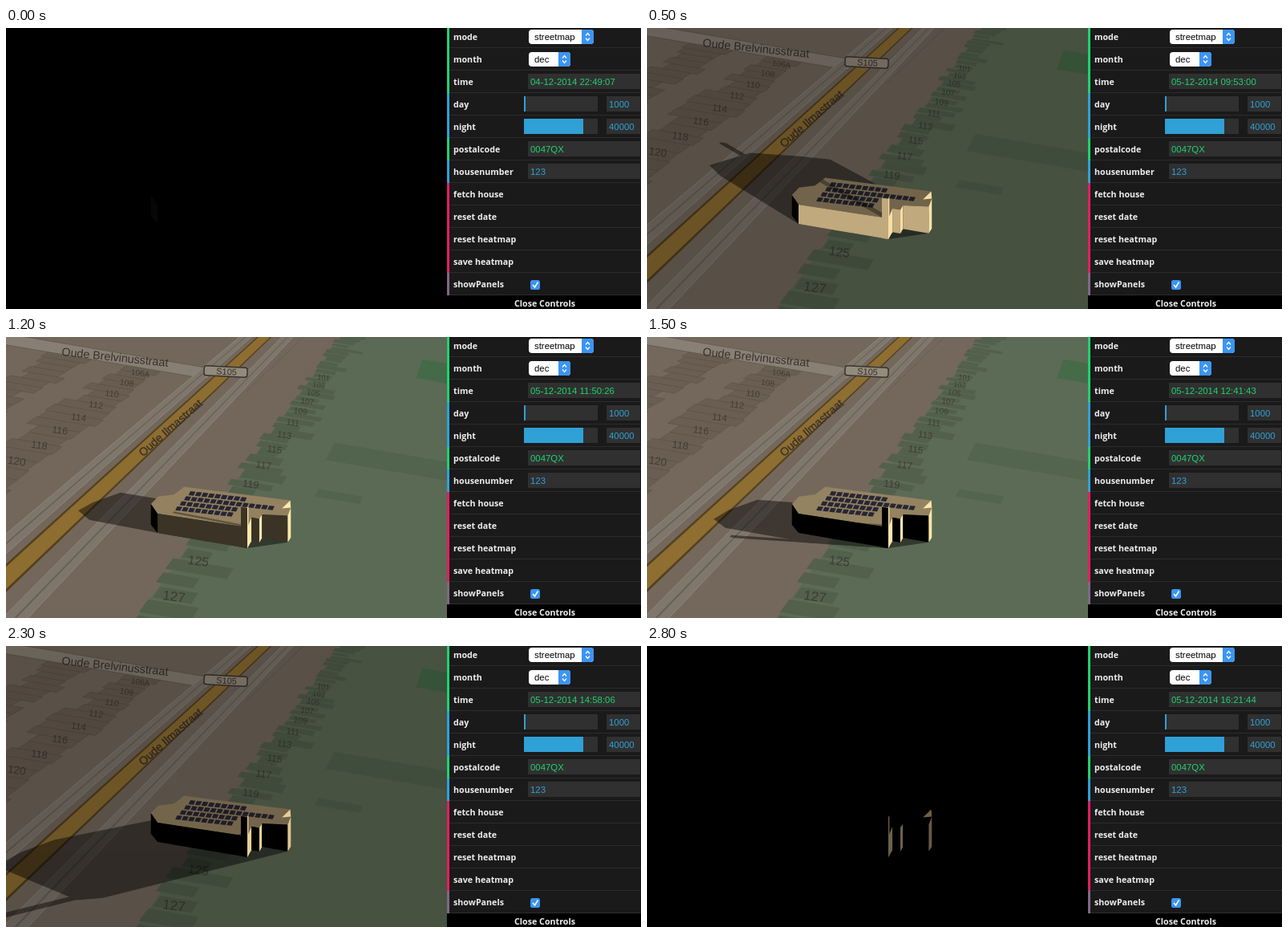
An HTML page that plays this animation: 792x350 px, repeating every 3100 ms.

```html
<!DOCTYPE html>
<html lang="en">
<head>
<meta charset="utf-8">
<title>Sun study</title>
<style>
html, body { margin: 0; width: 100%; height: 100%; overflow: hidden; background: #000; }
svg { display: block; width: 792px; height: 350px; }
.label { font: 700 10.7px "Open Sans", sans-serif; fill: #eee; }
.value { font: 11.4px "Liberation Sans", Arial, sans-serif; }
.map { font-family: "Liberation Sans", Arial, sans-serif; fill: #38312b; }
</style>
</head>
<body>
<svg id="stage" viewBox="0 0 792 350"></svg>
<script>
const GREEN = '#1ed36f', BLUE = '#2fa1d6', PINK = '#e61d5f', PURPLE = '#806787';
const rect = (x, y, w, h, fill, more = '') => `<rect x="${x}" y="${y}" width="${w}" height="${h}" fill="${fill}" ${more}/>`;
const poly = (points, fill, more = '') => `<polygon points="${points}" fill="${fill}" ${more}/>`;
const line = (points, width, color, more = '') => `<polyline points="${points}" fill="none" stroke="${color}" stroke-width="${width}" ${more}/>`;
const text = (x, y, str, cls, more = '') => `<text x="${x}" y="${y}" class="${cls}" ${more}>${str}</text>`;

// World axes: x along the house front, y up the main street, z up.
const depth = y => 1 + y / 980;
function project([x, y, z = 0]) {
  const w = depth(y);
  return [(189 + x + 620 * (w - 1)) / w, (244 + .17 * x - 277 * (w - 1) - z) / w];
}
const face = points => points.map(project).join(' ');
const quad = (x0, x1, y0, y1, fill, more) => poly(face([[x0, y0], [x1, y0], [x1, y1], [x0, y1]]), fill, more);

let seed = 7;
const random = (lo, hi) => lo + (hi - lo) * (seed = seed * 16807 % 2147483647) / 2147483647;

function mapText([x, y], str, size, angle, more = '') {
  return text(0, 0, str, 'map', `font-size="${size}" text-anchor="middle" dominant-baseline="central" transform="translate(${x} ${y}) rotate(${angle})" ${more}`);
}
const houseNumber = (n, x, y) => mapText(project([x, y]), n, 15 / depth(y), 8, 'opacity=".75"');

function drawMap() {
  const outline = 'stroke="#5d5348" stroke-width=".7"';
  let map = rect(0, 0, 550, 350, '#74685c') + quad(40, 700, -400, 2500, '#5c6b55'), numbers = '';
  for (let y = -300; y < 900; y += 26) {
    map += quad(random(10, 36), 45, y, y + 26, '#74685c')
      + quad(random(34, 48), random(75, 112), y, y + random(16, 26), '#52604c');
    if (y > 0 && y < 500) {
      map += quad(random(-300, -270), random(-225, -205), y, y + 26, '#6a5e52', outline)
        + quad(random(-430, -400), random(-370, -340), y, y + 26, '#6a5e52', outline);
    }
  }
  map += quad(160, 225, 150, 172, '#53644f') + quad(150, 420, 265, 330, '#53644f') + quad(245, 330, 700, 830, '#466b49');
  for (let n = 106; n <= 120; n += 2) numbers += houseNumber(n === 106 ? '106A' : n, -243, 109 + 26.5 * (120 - n));
  for (let n = 101; n <= 127; n += 2) {
    const k = (127 - n) / 2;
    numbers += houseNumber(n, 67, -111 + 70.9 * k - 1.17 * k * k);
  }
  map += quad(-900, -130, 505, 560, '#8a8075', outline);
  for (const x of [-145, -64])
    map += quad(x - 11, x + 11, -400, 1500, '#7f766c', 'stroke="#908880"') + quad(x - 1, x + 1, -400, 1500, '#686057');
  return map
    + quad(-123, -95, -400, 1500, '#53411f') + quad(-120, -98, -400, 1500, '#8f6e31')
    + line(face([[-20, 1200], [-45, 480]]), 1, '#55506b', 'stroke-dasharray="2 2"')
    + numbers
    + mapText([136, 25], 'Oude Brelvinusstraat', 14.3, 6)
    + mapText([205, 113], 'Oude Ilmastraat', 14, -41, 'stroke="#38312b" stroke-width=".3"')
    + rect(247, 37, 54, 12, '#968c7d', 'rx="3" stroke="#39342e" stroke-width="1.5" transform="rotate(3 274 43)"')
    + mapText([275, 43], 'S105', 11, 3);
}

// Roof corners, counted round from the front left.
const corners = [[0, 0, 24], [112, 0, 26], [112, 16, 30], [122, 16, 30], [122, 27, 30], [155, 27, 34],
  [156, 38, 39], [146, 72, 30], [4, 72, 24], [0, 49, 24], [-16, 38, 24], [-15, 15, 26]];
const chimney = [[104, 0, 50], [112, 0, 50], [112, 4, 50], [104, 4, 50]];
const floor = ([x, y]) => [x, y, 0];

function walls(top) {
  return top.map((a, i) => {
    const b = top[(i + 1) % top.length], dx = b[0] - a[0], dy = b[1] - a[1], size = Math.hypot(dx, dy);
    return { points: [a, b, floor(b), floor(a)], normal: [dy / size, -dx / size, 0] };
  }).filter(({ points: [a, b] }) => project(b)[0] > project(a)[0] + .3);
}
const faces = [
  { points: corners, normal: [0, 0, 1] },
  { points: [corners[6], corners[7], [144, 40, 35]], normal: [1, 0, 0] },
  ...walls(corners), ...walls(chimney)
];

function drawHouse() {
  let cells = '';
  for (let row = 0; row < 4; row++)
    for (let col = 0; col < (row === 1 ? 14 : 9); col++)
      cells += `M${230 - 5.5 * row + 8 * col} ${192 + 6.3 * row + .9 * col}l6.4 .7l-2.4 5l-6.4-.7z`;
  const [roof, ...rest] = faces.map(f => poly(face(f.points), '#000', 'class="face"'));
  return roof + `<path id="panels" d="${cells}"/>`
    + `<clipPath id="roofClip">${poly(face(corners), '#000')}</clipPath>`
    + `<g clip-path="url(#roofClip)">${poly('', '#000', 'id="streak" opacity=".35"')}</g>` + rest.join('');
}

function drawControls() {
  const rows = [['mode', GREEN], ['month', GREEN], ['time', GREEN], ['day', BLUE], ['night', BLUE],
    ['postalcode', GREEN], ['housenumber', BLUE], ['fetch house', PINK], ['reset date', PINK],
    ['reset heatmap', PINK], ['save heatmap', PINK], ['showPanels', PURPLE]];
  const arrow = (x, y, dy) => line([x, y, x + 2.5, y + dy, x + 5, y], 1.3, '#fff');
  const select = (y, w, str) => rect(652, y, w, 18, '#fff', 'rx="4"')
    + rect(637 + w, y, 15, 18, '#3b94f5', 'rx="4"') + rect(637 + w, y, 5, 18, '#3b94f5')
    + arrow(642 + w, y + 7.5, -3) + arrow(642 + w, y + 10.5, 3)
    + text(659, y + 13, str, 'value', 'fill="#000"');
  const input = (x, y, str, color, more = '') => rect(x, y, 791 - x, 19, '#303030')
    + text(x + 3, y + 14, str, 'value', `fill="${color}" ${more}`);
  const slider = (y, w, str) => rect(646, y, 92, 19, '#303030') + rect(646, y, w, 19, BLUE) + input(749, y, str, BLUE);
  return rect(550, 0, 242, 350, '#1a1a1a')
    + rows.map(([name, color], i) => rect(550, 28 * i + 24, 242, 1, '#2c2c2c')
      + rect(550, 28 * i - 3, 3, 28, color) + text(558, 28 * i + 15, name, 'label')).join('')
    + select(2, 81, 'streetmap') + select(30, 52, 'dec')
    + input(651, 57, '', GREEN, 'id="clock"')
    + slider(85, 2, '1000') + slider(113, 74, '40000')
    + input(651, 141, '0047QX', GREEN) + input(651, 169, '123', BLUE)
    + rect(654, 314, 12, 12, '#3b94f5', 'rx="2.5"') + line('657,320 659.5,323 663.5,316.5', 1.6, '#fff')
    + rect(550, 333, 242, 17, '#000') + text(672, 347, 'Close Controls', 'label', 'text-anchor="middle"');
}

const stage = document.getElementById('stage');
stage.innerHTML = drawMap() + rect(0, 0, 550, 350, '#000', 'id="dark"')
  + `<g opacity=".45">${poly('', '#000', 'id="shadow"')}${poly('', '#000', 'id="spike"')}</g>`
  + drawHouse() + drawControls();
const $ = id => document.getElementById(id);
const faceNodes = [...document.querySelectorAll('.face')];

// Sun direction in world axes for an hour of a December day at 51.8 degrees north.
function sunAt(hour) {
  const { sin, cos } = Math, rad = Math.PI / 180;
  const lat = 51.8 * rad, decl = -22.3 * rad, turn = (hour - 12.45) * 15 * rad;
  const up = sin(lat) * sin(decl) + cos(lat) * cos(decl) * cos(turn);
  const azimuth = Math.atan2(cos(decl) * sin(turn), sin(lat) * cos(decl) * cos(turn) - cos(lat) * sin(decl));
  const flat = Math.sqrt(1 - up * up), angle = azimuth + .117;
  const strength = Math.min(1, Math.max(.005, .28 + .14 * Math.asin(up) / rad));
  return { dir: [flat * cos(angle), flat * sin(angle), up], strength };
}

function hull(points) {
  const cross = (o, a, b) => (a[0] - o[0]) * (b[1] - o[1]) - (a[1] - o[1]) * (b[0] - o[0]);
  const half = list => list.reduce((out, p) => {
    while (out.length > 1 && cross(out.at(-2), out.at(-1), p) <= 0) out.pop();
    return [...out, p];
  }, []);
  const sorted = [...points].sort((a, b) => a[0] - b[0] || a[1] - b[1]);
  return [...half(sorted), ...half(sorted.reverse())];
}

function castShadow(id, top, plane, [sx, sy, sz]) {
  const base = top.map(([x, y]) => [x, y, plane]);
  const tips = top.map(([x, y, z]) => {
    const reach = (z - plane) / Math.max(sz, .055);
    return [x - sx * reach, y - sy * reach, plane];
  });
  $(id).setAttribute('points', hull([...base, ...tips].map(project)).join(' '));
}

// Clock readings in hours at a few steps; it runs evenly between them.
const hms = (h, m, s) => h + m / 60 + s / 3600;
const readings = [[1, hms(8, 46, 26)], [2, hms(9, 3, 5)], [8, hms(10, 42, 54)], [12, hms(11, 50, 26)],
  [19, hms(13, 50, 6)], [26, hms(15, 49, 6)], [28, hms(16, 21, 44)]];
function hourAt(step) {
  if (step === 0) return hms(22, 49, 7);
  const k = Math.max(1, readings.findIndex(r => r[0] >= step));
  const [s0, h0] = readings[k - 1], [s1, h1] = readings[k];
  return h0 + (h1 - h0) * (step - s0) / (s1 - s0);
}

function render(step) {
  const hour = hourAt(step), { dir, strength } = sunAt(hour);
  const light = normal => Math.max(0, strength * normal.reduce((sum, n, i) => sum + n * dir[i], 0)) ** (1 / 2.2);
  const shade = (base, amount) => `rgb(${base.map(c => Math.min(255, Math.round(c * amount)))})`;
  const ground = light([0, 0, 1]) / .556;

  const clock = new Date(Math.round(hour * 3600) * 1000).toISOString().slice(11, 19);
  $('clock').textContent = `0${step ? 5 : 4}-12-2014 ${clock}`;
  $('dark').setAttribute('opacity', Math.max(0, 1 - ground));
  $('panels').setAttribute('fill', shade([40, 38, 52], ground));
  faces.forEach((f, i) => faceNodes[i].setAttribute('fill', shade([268, 236, 175], light(f.normal))));
  castShadow('shadow', corners, 0, dir);
  castShadow('spike', chimney, 0, dir);
  castShadow('streak', chimney, 26, dir);
}

function tick() {
  render(Math.min(28, Math.floor(performance.now() % 3100 / 100)));
  requestAnimationFrame(tick);
}
tick();
</script>
</body>
</html>
```
